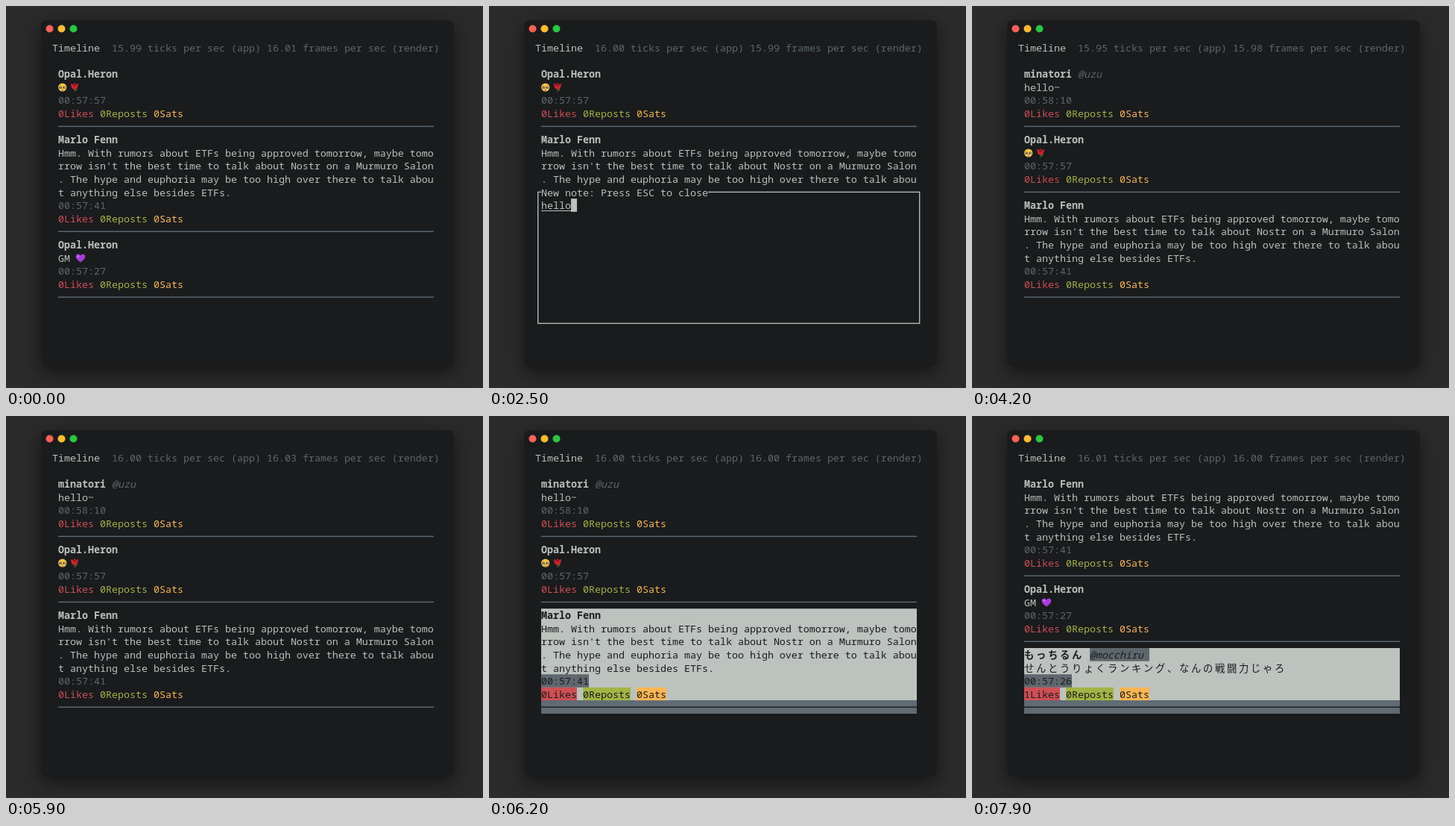
An HTML page with a canvas for the animation above (8000 ms loop, 640x512 px).

```html
<!DOCTYPE html>
<html lang="en">
<head>
<meta charset="utf-8">
<title>Timeline</title>
<style>
html, body { margin: 0; width: 100%; height: 100%; overflow: hidden; background: #2b2b2b; }
canvas { display: block; }
</style>
</head>
<body>
<canvas id="stage" width="640" height="512"></canvas>
<script>
const ctx = document.getElementById('stage').getContext('2d');
const LOOP = 8000, CELL = 8, ROW = 17.6, TOP = 47, LEFT = 70, WIDTH = 504;
const BG = '#191b1d', FG = '#bcc2be', DIM = '#5d686e', RULE = '#5f6c75',
      RED = '#cf4f55', GREEN = '#a3b445', ORANGE = '#fab653';
const FONT = '13.333px "Noto Sans Mono", "Noto Sans CJK JP", "Noto Sans CJK", monospace';

const notes = [
  { name: 'minatori', handle: '@uzu', body: ['hello~'], time: '00:58:10' },
  { name: 'Opal.Heron', body: [''], icons: [[0, face], [2, rose]], time: '00:57:57' },
  { name: 'Marlo Fenn', body: [
      'Hmm. With rumors about ETFs being approved tomorrow, maybe tomo',
      "rrow isn't the best time to talk about Nostr on a Murmuro Salon",
      '. The hype and euphoria may be too high over there to talk abou',
      't anything else besides ETFs.'], time: '00:57:41' },
  { name: 'Opal.Heron', body: ['GM'], icons: [[3, heart]], time: '00:57:27' },
  { name: 'もっちるん', handle: '@mocchiru', body: ['せんとうりょくランキング、なんの戦闘力じゃろ'],
    time: '00:57:26', likes: 1 }
];

// Timelines: [start in ms, value]
const ticks = [[0, '15.99'], [200, '16.01'], [1300, '15.98'], [2300, '16.00'], [3300, '15.95'],
               [4300, '16.01'], [5300, '16.00'], [6300, '15.95'], [7300, '16.01']];
const frames = [[0, '16.01'], [800, '15.99'], [2800, '16.02'], [3800, '15.98'], [4800, '16.01'],
                [5800, '16.03'], [6000, '16.00'], [7300, '15.90'], [7800, '16.00']];
const firstNote = [[0, 1], [4200, 0], [6400, 1], [6800, 2]];
const selected = [[0, -1], [6000, 0], [6100, 1], [6200, 2], [6400, 3], [6800, 4]];
const draft = [[0, null], [1100, ''], [1900, 'h'], [2000, 'he'], [2200, 'hel'], [2300, 'hell'],
               [2400, 'hello'], [2800, 'hello~'], [3900, null]];

const at = (list, t) => list.filter(e => e[0] <= t).pop()[1];
const rowTop = row => TOP + row * ROW;
const rowMid = row => rowTop(row) + ROW / 2;

function box(x, y, w, h, color) {
  ctx.fillStyle = color;
  ctx.fillRect(x, y, w, h);
}

function oval(x, y, rx, ry, color) {
  ctx.fillStyle = color;
  ctx.beginPath();
  ctx.ellipse(x, y, rx, ry, 0, 0, 7);
  ctx.fill();
}

function shape(path, x, y, color) {
  ctx.save();
  ctx.translate(x, y);
  ctx.fillStyle = color;
  ctx.fill(new Path2D(path));
  ctx.restore();
}

// Writes on the cell grid (wide characters take two cells); returns the end x.
function write(text, x, row, color, style = '') {
  ctx.font = style + ' ' + FONT;
  ctx.fillStyle = color;
  const y = rowTop(row) + 14;
  if (!/[^\x00-\x7f]/.test(text)) {
    ctx.fillText(text, x, y);
    return x + text.length * CELL;
  }
  for (const c of text) {
    ctx.fillText(c, x, y);
    x += 2 * CELL;
  }
  return x;
}

// Coloured text, or dark text on that colour when highlighted.
function span(text, x, row, color, on, style) {
  if (on) box(x, rowTop(row), text.length * CELL, ROW, color);
  return write(text, x, row, on ? BG : color, style);
}

function face(x, y) {
  oval(x + 5.7, y, 5.6, 5.6, '#f6c445');
  for (const dx of [3.3, 8.1]) {
    oval(x + dx, y + .6, 1.7, 2, '#49311c');
    oval(x + dx + .3, y, .7, .7, '#fff');
    oval(x + dx, y + 2.2, 1.2, .6, '#e8eef2');
  }
  box(x + 4.5, y + 3.5, 2.4, .8, '#7a4a1e');
}

function rose(x, y) {
  shape('M5 1 Q6 4 5.2 6 L6.6 6 Q7 3 6.4 1Z M6 4 Q9 1 10 2 Q9 5 6 5Z', x, y, '#47672d');
  shape('M1 -5 L4 -4 L6 -6 L8 -4 L11 -5 Q11 2 6 3 Q1 2 1 -5Z', x, y, '#c9252b');
  oval(x + 6, y - 3, 2.2, 1.5, '#8d141c');
}

function heart(x, y) {
  shape('M6 5.8 C1 2 -.5 0 -.3 -2.2 C0 -6 4.6 -6.2 6 -3 C7.4 -6.2 12 -6 12.3 -2.2 C12.5 0 11 2 6 5.8Z',
    x, y, '#a63ddd');
  oval(x + 3, y - 2.3, 1.5, 1.2, '#c976f2');
}

function drawNote(n, row, on) {
  const ink = on ? BG : FG;
  if (on) box(LEFT, rowTop(row), WIDTH, (n.body.length + 3) * ROW, FG);
  const end = write(n.name, LEFT, row, ink, 'bold');
  if (n.handle) span(n.handle + ' ', end + CELL, row, DIM, on, 'italic');
  for (const line of n.body) write(line, LEFT, ++row, ink);
  for (const [col, icon] of n.icons || []) icon(LEFT + col * CELL, rowMid(row) + .4);
  span(n.time, LEFT, ++row, DIM, on);
  row++;
  let x = span((n.likes || 0) + 'Likes', LEFT, row, RED, on);
  x = span('0Reposts', x + CELL, row, GREEN, on);
  span('0Sats', x + CELL, row, ORANGE, on);
  row++;
  if (on) box(LEFT, rowTop(row), WIDTH, ROW, RULE);
  box(LEFT, rowMid(row) - .7, WIDTH, 1.4, on ? BG : RULE);
  return row + 1;
}

function drawEditor(text) {
  const title = 'New note: Press ESC to close';
  box(62, rowTop(11), 520, 11 * ROW, BG);
  ctx.strokeStyle = FG;
  ctx.lineWidth = 1.3;
  ctx.strokeRect(65.7, rowMid(11), 512, 10 * ROW);
  box(LEFT, rowTop(11), title.length * CELL, ROW, BG);
  write(title, LEFT, 11, FG);
  const end = write(text, LEFT, 12, FG);
  box(LEFT, rowTop(12) + 15.8, end - LEFT, 1, FG);
  box(end, rowTop(12), CELL, ROW, FG);
}

function drawWindow() {
  box(0, 0, 640, 512, '#2b2b2b');
  ctx.save();
  ctx.shadowColor = 'rgba(0,0,0,.55)';
  ctx.shadowBlur = 24;
  ctx.shadowOffsetY = 8;
  ctx.fillStyle = BG;
  ctx.beginPath();
  ctx.roundRect(47, 19, 554, 464, 8);
  ctx.fill();
  ctx.restore();
  ['#ff5f57', '#febc2e', '#28c840'].forEach((c, i) => oval(58.5 + 16 * i, 30.5, 5, 5, c));
}

function draw(t) {
  drawWindow();
  write('Timeline', 62, 0, FG);
  write(`${at(ticks, t)} ticks per sec (app) ${at(frames, t)} frames per sec (render)`, 142, 0, DIM);
  const first = at(firstNote, t), sel = at(selected, t), text = at(draft, t);
  let row = 2;
  for (let i = first; i < first + 3; i++) row = drawNote(notes[i], row, i === sel);
  if (text !== null) drawEditor(text);
}

const start = performance.now();
function tick() {
  draw((performance.now() - start) % LOOP);
  requestAnimationFrame(tick);
}
tick();
</script>
</body>
</html>
```
